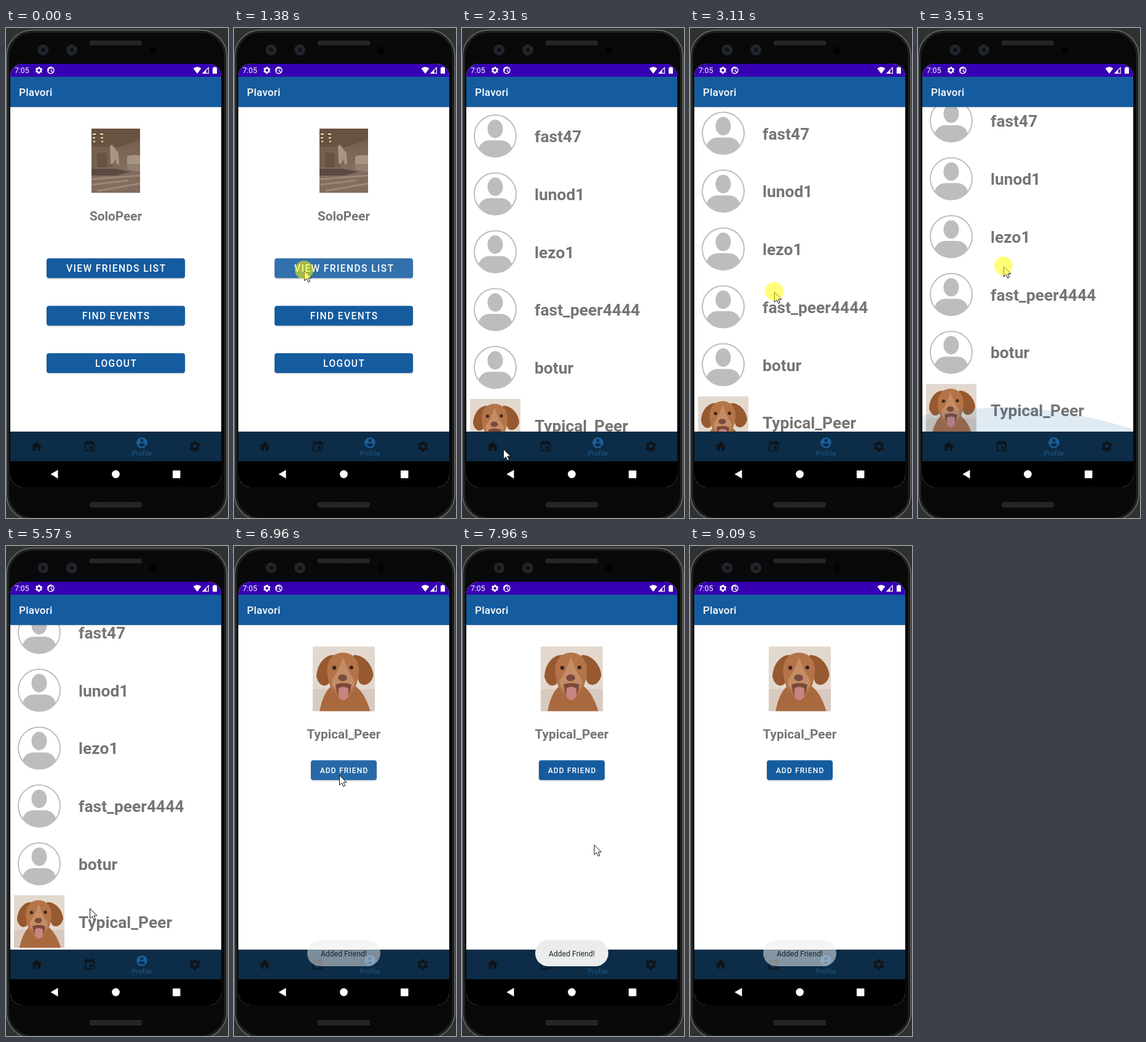
Write an HTML page that moves like this. It is 361x794 px and loops after 9160 ms.

```html
<!DOCTYPE html>
<html lang="en">
<head>
<meta charset="utf-8">
<title>Plavori</title>
<style>
  html, body { margin: 0; width: 100%; height: 100%; overflow: hidden; background: #303131; }
  svg { display: block; }
  #stage { width: 361px; height: 794px; }
  text { font-family: Roboto, Arial, sans-serif; }
  .name { font-weight: 700; fill: #757575; }
  .big { font-size: 26.4px; }
  .title { font-size: 20.8px; text-anchor: middle; }
  .btn { font-weight: 500; fill: #fff; text-anchor: middle; }
</style>
</head>
<body>
<svg id="stage" viewBox="0 0 361 794">
  <defs>
    <clipPath id="screen"><rect x="7" y="58" width="343" height="686" rx="20"/></clipPath>
    <clipPath id="content"><rect x="7" y="128" width="343" height="526"/></clipPath>
    <pattern id="grille" width="4" height="4" patternUnits="userSpaceOnUse">
      <rect width="4" height="4" fill="#1b1b1b"/>
      <path d="M0 1h2M2 3h2" stroke="#454545" stroke-width="1.2"/>
    </pattern>
    <linearGradient id="drop" x2="0" y2="1">
      <stop stop-color="#000" stop-opacity=".12"/><stop offset="1" stop-color="#000" stop-opacity="0"/>
    </linearGradient>
    <linearGradient id="wall" x2="0" y2="1">
      <stop stop-color="#66513f"/><stop offset=".3" stop-color="#7b6453"/><stop offset="1" stop-color="#8a7567"/>
    </linearGradient>
    <filter id="soft"><feGaussianBlur stdDeviation="1"/></filter>

    <g id="avatar">
      <circle r="34" fill="#fff" stroke="#bcbdbf" stroke-width="2"/>
      <ellipse cy="-11.5" rx="12.5" ry="15" fill="#bcbdbf"/>
      <path d="M-27 20C-24 11-17 7-9 7H9C17 7 24 11 27 20A33.5 33.5 0 0 1-27 20Z" fill="#bcbdbf"/>
    </g>

    <symbol id="dog" viewBox="0 0 82 85">
      <rect width="82" height="85" fill="#e3d8ce"/>
      <path d="M0 56H82V85H0Z" fill="#d8cabe"/>
      <path d="M9 85C13 64 22 46 40 46S70 64 76 85Z" fill="#a9693f"/>
      <path d="M28 11C14 11 5 26 5 40 8 51 15 54 21 49L31 24Z" fill="#97592f"/>
      <path d="M54 11C68 11 79 24 80 38 77 50 68 53 62 48L51 24Z" fill="#97592f"/>
      <path d="M40 8C53 8 61 18 61 31 61 48 53 66 40 66S19 48 19 31C19 18 27 8 40 8Z" fill="#b47448"/>
      <path d="M40 14C44 24 46 32 54 43 57 53 49 59 40 59S23 53 26 43C34 32 36 24 40 14Z" fill="#c58d65"/>
      <path d="M30 50Q40 46 51 50Q49 66 40 70Q32 66 30 50Z" fill="#7d4a3a"/>
      <path d="M34 55Q40 51 47 55V66Q40 75 34 66Z" fill="#c78481"/>
      <ellipse cx="39.5" cy="41" rx="6" ry="4.4" fill="#794b3e"/>
      <circle cx="28.5" cy="28" r="2.6" fill="#3b261d"/><circle cx="51" cy="27.500" r="2.6" fill="#3b261d"/>
    </symbol>

    <g id="gear" fill="none" stroke="currentColor" transform="rotate(30)">
      <circle r="5" stroke-width="3.6"/>
      <circle r="7.2" stroke-width="2.6" stroke-dasharray="4 3.54" stroke-dashoffset="2"/>
    </g>
  </defs>

  <!-- phone body -->
  <rect width="361" height="794" fill="#303131"/>
  <rect x="1" y="3.5" width="358" height="794" rx="42" fill="#0d0e0e" stroke="#5f6060" stroke-width="2"/>
  <rect x="4" y="6.5" width="352" height="788" rx="39" fill="#090909" stroke="#232424" stroke-width="2"/>
  <rect x="136" y="20.5" width="85" height="7.5" rx="2.5" fill="url(#grille)"/>
  <rect x="136" y="768" width="85" height="9" rx="3" fill="url(#grille)"/>
  <g id="lenses"></g>
  <circle cx="239" cy="36" r="6" fill="#020203"/>

  <g clip-path="url(#screen)">
    <rect x="7" y="58" width="343" height="686" fill="#fff"/>

    <g clip-path="url(#content)">
      <g id="home">
        <svg x="139" y="163" width="79" height="104">
          <rect width="79" height="104" fill="url(#wall)"/>
          <path d="M0 0H79V17L45 30H0Z" fill="#67533f"/>
          <path d="M0 31H34V65H0Z" fill="#74604f"/>
          <path d="M9 39H25V64H9Z" fill="#665342"/>
          <path d="M2 9h5M14 9h5M2 15h4M15 15h4M3 21h3M16 21h3" stroke="#f0e3cb" stroke-width="1.8"/>
          <path d="M0 63H79V104H0Z" fill="#816c5e"/>
          <path d="M0 65H38L64 70 41 76H0Z" fill="#594b42"/>
          <path d="M58 45Q69 41 79 44V70L58 66Z" fill="#a69585"/>
          <path d="M58 57H79V70L58 66Z" fill="#927f70"/>
          <path d="M30 29Q33 23 36 30L44 40 45 58H41L39 49 35 57H31Z" fill="#aa9583"/>
          <path d="M0 82L79 76M0 91L60 84M10 101L79 89" stroke="#9b8677" stroke-width="3"/>
        </svg>
        <text class="name title" x="178.5" y="311.5">SoloPeer</text>
        <g id="menu"></g>
      </g>

      <g id="list"></g>
      <circle id="glow" cx="135" r="680" fill="#155c9f"/>

      <g id="person">
        <use href="#dog" x="128" y="163" width="101" height="104.7"/>
        <text class="name title" x="178.5" y="311.5">Typical_Peer</text>
        <g id="add"></g>
      </g>
    </g>

    <!-- top bars -->
    <rect x="7" y="128" width="343" height="3" fill="url(#drop)"/>
    <rect x="7" y="79" width="343" height="49" fill="#155c9f"/>
    <rect x="7" y="58" width="343" height="21" fill="#3700b3"/>
    <text x="14" y="73.2" font-size="12.2" fill="#fff">7:05</text>
    <use href="#gear" transform="translate(53.5 68.5) scale(.68)" color="#fff"/>
    <g fill="none" stroke="#fff" stroke-width="1.4">
      <circle cx="72.8" cy="68.5" r="5.2"/>
      <path d="M70 70a3 3 0 1 1 5-2.6M72.5 68.3l4 4"/>
    </g>
    <g fill="#fff">
      <path d="M304.5 65.5Q311 60.5 317.5 65.5L311 74Z"/>
      <path d="M329.3 64.2V73.3H320.2Z" fill="none" stroke="#fff" stroke-width="1.2"/>
      <path d="M325.5 67.5V73.5H320Z"/>
      <path d="M338 63h3v1.3h2V74h-7V64.3h2Z"/>
    </g>
    <text x="21" y="109.8" font-size="17" font-weight="500" letter-spacing=".3" fill="#fff">Plavori</text>

    <!-- bottom bars -->
    <rect x="7" y="654" width="343" height="48" fill="#0c2c47"/>
    <g id="tabs" fill="#101317" fill-rule="evenodd">
      <path transform="translate(39.5 667.5) scale(.875)" d="M10 20v-6h4v6h5v-8h3L12 3 2 12h3v8z"/>
      <path transform="translate(125.5 667.5) scale(.875)" d="M17 12h-5v5h5zM16 1v2H8V1H6v2H5a2 2 0 0 0-2 2v14a2 2 0 0 0 2 2h14a2 2 0 0 0 2-2V5a2 2 0 0 0-2-2h-1V1zm3 18H5V8h14z"/>
      <path transform="translate(210.5 661.5) scale(.875)" fill="#185f9f" d="M12 2a10 10 0 1 0 0 20 10 10 0 0 0 0-20zm0 3a3 3 0 1 1 0 6 3 3 0 0 1 0-6zm0 14.2c-2.5 0-4.7-1.3-6-3.2 0-2 4-3.1 6-3.1s6 1.1 6 3.1c-1.3 1.9-3.5 3.2-6 3.2z"/>
    </g>
    <use href="#gear" transform="translate(307 678)" color="#101317"/>
    <text x="221.2" y="693" font-size="10.2" letter-spacing=".4" text-anchor="middle" fill="#185f9f">Profile</text>
    <rect x="7" y="702" width="343" height="42" fill="#000"/>
    <g fill="#fff">
      <path d="M72.5 723L84.5 716V730Z"/><circle cx="178.5" cy="723" r="6.4"/>
      <rect x="271" y="717" width="12.5" height="12.5" rx="1"/>
    </g>

    <g id="toast">
      <rect x="119" y="638.5" width="119" height="42.5" rx="21.2" fill="#ebecec"/>
      <text x="178.5" y="664.5" font-size="12.2" text-anchor="middle" fill="#1c262e">Added Friend!</text>
    </g>
  </g>

  <g id="cursor">
    <path d="M.5.5V16.5L4.3 13 6.8 18.7 9.5 17.5 7 12H12Z" fill="#fff" stroke="#111" stroke-linejoin="round"/>
    <circle id="press" cy="-1" r="15" fill="#ff0" fill-opacity=".52"/>
  </g>
</svg>

<script>
const LOOP = 9160, FIRST = 250, STEP = 66.47;
const LIST_IN = 1840, DRAG = 2970, DROP = 4700, PERSON_IN = 5630;
const ROW = 93.75, MAX_SCROLL = 36;
const $ = id => document.getElementById(id);
const clamp = (v, a, b) => Math.min(b, Math.max(a, v));
const ramp = (t, a, b) => clamp((t - a) / (b - a), 0, 1);

function add(parent, tag, attrs, text) {
  const el = document.createElementNS('http://www.w3.org/2000/svg', tag);
  for (const k in attrs) el.setAttribute(k, attrs[k]);
  if (text) el.textContent = text;
  return parent.appendChild(el);
}

function button(parent, x, y, w, label, size) {
  const box = { x, y, width: w, height: 32, rx: 4 };
  add(parent, 'rect', { ...box, y: y + 1, fill: '#000', opacity: .25, filter: 'url(#soft)' });
  add(parent, 'rect', { ...box, fill: '#155c9f' });
  const ripple = add(parent, 'rect', { ...box, fill: '#fff', opacity: 0 });
  const gap = size * .09;
  add(parent, 'text', {
    class: 'btn', x: x + w / 2 + gap / 2, y: y + 16 + size * .36,
    'font-size': size, 'letter-spacing': gap
  }, label);
  return ripple;
}

for (const cx of [60.5, 107]) {
  add($('lenses'), 'circle', { cx, cy: 35.5, r: 9, fill: '#202429' });
  add($('lenses'), 'circle', { cx, cy: 35.5, r: 5, fill: '#11151b', stroke: '#343a42' });
}

const [menuRipple] = ['VIEW FRIENDS LIST', 'FIND EVENTS', 'LOGOUT']
  .map((label, i) => button($('menu'), 66, 373.3 + i * 76.9, 225, label, 15.6));
const addRipple = button($('add'), 125, 347.3, 107, 'ADD FRIEND', 12.1);

['fast47', 'lunod1', 'lezo1', 'fast_peer4444', 'botur', 'Typical_Peer'].forEach((name, i, all) => {
  const y = 175 + i * ROW;
  if (i < all.length - 1) add($('list'), 'use', { href: '#avatar', x: 54, y });
  else add($('list'), 'use', { href: '#dog', x: 13, y: y - 42.7, width: 82, height: 85 });
  add($('list'), 'text', { class: 'name big', x: 118, y: y + 10 }, name);
});

// while the button is held the hand swings up and down and drifts a little
function drag(t) {
  const swings = (t - 3510) / 730;
  return [139 + 4 * swings, 406 - 32 * Math.cos(2 * Math.PI * swings + .935) + 8 * swings];
}

// the list follows the hand; pulling past its end raises a glow that sinks again
function pull(t) {
  let scroll = 0, glow = 0, y = drag(DRAG)[1];
  for (let s = DRAG; s <= Math.min(t, DROP) + 5; s += STEP) {
    const next = drag(s)[1], want = scroll + y - next;
    scroll = clamp(want, 0, MAX_SCROLL);
    glow = glow * .95 + Math.max(0, want - MAX_SCROLL) * 1.9;
    y = next;
  }
  return { scroll, glow: glow * (1 - ramp(t, DROP, DROP + 70)) };
}

// moves of the pointer: start, end, place reached
const moves = [
  [250, 380, 127, 409], [580, 715, 111, 393], [915, 1110, 114, 393],
  [1975, 2310, 67, 682], [2310, 2410, 31, 696], [2410, 2840, 157, 450], [2840, DRAG, ...drag(DRAG)],
  [DRAG, DROP, ...drag(DROP)], [DROP, 5300, 136, 587],
  [5905, 6240, 108, 440], [6240, 6500, 140, 326], [6500, 6760, 171, 371],
  [7565, 8160, 230, 524], [8300, 8760, 286, 800]
];

function pointer(t) {
  if (t >= DRAG && t < DROP) return drag(t);
  let p = [211, 562];
  for (const [a, b, x, y] of moves) {
    const k = ramp(t, a, b), e = k * k * (3 - 2 * k);
    p = [p[0] + (x - p[0]) * e, p[1] + (y - p[1]) * e];
  }
  return p;
}

const pressed = t => [[1305, 1435], [DRAG - 5, DROP], [5370, 5500], [6690, 6825]]
  .some(([a, b]) => t >= a && t < b);

const set = (el, attr, value) => el.setAttribute(attr, value);
const show = (id, on) => set($(id), 'visibility', on ? 'visible' : 'hidden');

function draw(now) {
  const raw = now % LOOP;
  // the picture advances about fifteen times a second
  const t = raw < FIRST ? 0 : FIRST + Math.floor((raw - FIRST + 5) / STEP) * STEP;
  const late = t + 5;

  show('home', late < 1510);
  show('list', late >= LIST_IN && late < PERSON_IN);
  show('person', late >= PERSON_IN);

  const { scroll, glow } = pull(t);
  set($('list'), 'transform', `translate(0 ${-scroll})`);
  set($('glow'), 'cy', 654 - glow + 680);
  set($('glow'), 'opacity', Math.min(.13, glow / 300));

  set(menuRipple, 'opacity', .13 * ramp(t, 1300, 1380));
  set(addRipple, 'opacity', .08 * (ramp(t, 6690, 6760) - ramp(t, 6960, 7290)));
  set($('toast'), 'opacity', .5 * ramp(t, 6850, 6960) + .5 * ramp(t, 6960, 7230) - ramp(t, 8890, 9330));

  show('cursor', t >= FIRST && late < 8760);
  set($('cursor'), 'transform', `translate(${pointer(t).join(' ')})`);
  show('press', pressed(late) && t >= FIRST);
}

const start = performance.now();
function tick() {
  draw(performance.now() - start);
  requestAnimationFrame(tick);
}
tick();
</script>
</body>
</html>
```
